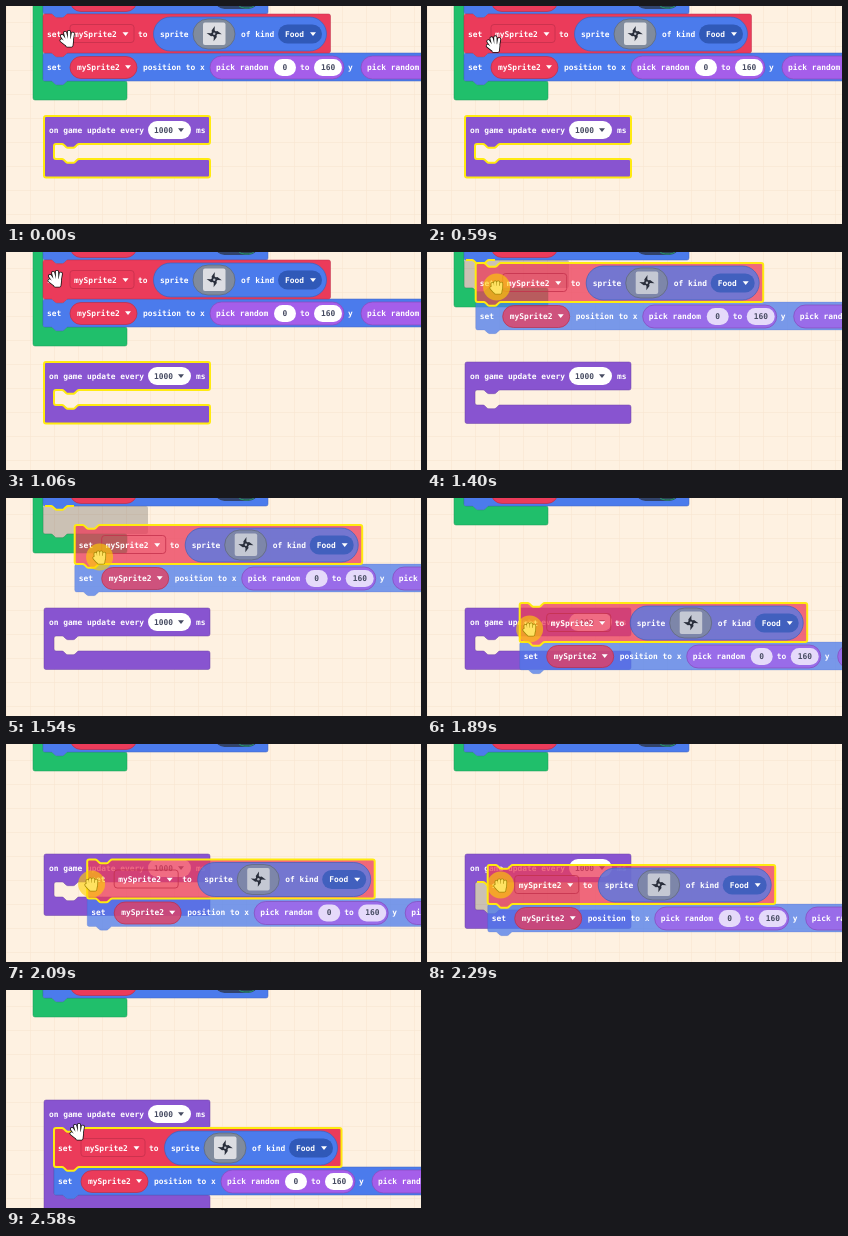
Animation, 415 px wide and 218 px high, one loop 4.56 s. Source, as an HTML page:

```html
<!DOCTYPE html>
<html lang="en">
<head>
<meta charset="utf-8">
<title>Moving code blocks</title>
<style>
html, body { margin: 0; width: 100%; height: 100%; overflow: hidden; background: #fef1e1; }
svg { display: block; }
text { font: 700 7.9px "DejaVu Sans Mono", "Noto Sans Mono", monospace; fill: #fff; }
text.dark { fill: #474c62; }
.drag .b { fill-opacity: .75; }
.drag .edge { stroke-opacity: .4; }
.sel { stroke: #ffea10; stroke-width: 2; stroke-opacity: 1 !important; }
</style>
</head>
<body>
<svg id="stage" width="415" height="218" viewBox="0 0 415 218"></svg>
<script>
const RED = '#eb3b5a', BLUE = '#4b7bec', PURPLE = '#8854d0', GREEN = '#20bf6b', MATH = '#a55eea';
const EDGE = { [RED]: '#bc2f48', [BLUE]: '#3c62bd', [PURPLE]: '#6d43a6', [GREEN]: '#1a9956', [MATH]: '#844bbb' };

// Connector outline, drawn to the right (s = 1) or to the left (s = -1)
const notch = s => `c${.9 * s},0 ${1.4 * s},.5 ${1.9 * s},.9l${1.9 * s},1.9` +
  `c${.5 * s},.5 ${.9 * s},.9 ${1.9 * s},.9h${5.6 * s}` +
  `c${.9 * s},0 ${1.4 * s},-.5 ${1.9 * s},-.9l${1.9 * s},-1.9c${.5 * s},-.5 ${.9 * s},-.9 ${1.9 * s},-.9`;

const rowPath = (w, h) => `M0,2q0,-2 2,-2h6${notch(1)}H${w - 2}q2,0 2,2V${h - 2}` +
  `q0,2 -2,2H25${notch(-1)}h-6q-2,0 -2,-2z`;

const loopPath = (w, gap, bar) => `M0,2q0,-2 2,-2H${w - 2}q2,0 2,2V26q0,2 -2,2H35${notch(-1)}H12` +
  `q-2,0 -2,2V${26 + gap}q0,2 2,2h6${notch(1)}H${w - 2}q2,0 2,2v${bar - 4}q0,2 -2,2H2q-2,0 -2,-2z`;

const path = (d, fill, id = '') =>
  `<path class="b edge" id="${id}" d="${d}" fill="${fill}" stroke="${EDGE[fill]}" stroke-width=".5"/>`;
const pill = (x, y, w, h, fill, edge = EDGE[fill] || 'none') =>
  `<rect class="b" x="${x}" y="${y}" width="${w}" height="${h}" rx="${h / 2}" fill="${fill}" stroke="${edge}" stroke-width=".7"/>`;
const text = (x, y, s, cls = '') => `<text class="${cls}" x="${x}" y="${y + 2.7}">${s}</text>`;
const arrow = (x, y, fill = '#fff') => `<path d="M${x - 3},${y - 1.7}h6l-3,3.6z" fill="${fill}"/>`;
const group = (id, x, y, body) => `<g id="${id}" transform="translate(${x} ${y})">${body}</g>`;

const random = x => pill(x, 42, 134, 23, MATH) + text(x + 6, 53, 'pick random') +
  pill(x + 64, 45, 22, 17, '#fff') + text(x + 72.6, 53, '0', 'dark') + text(x + 90, 53, 'to') +
  pill(x + 104, 45, 28, 17, '#fff') + text(x + 111, 53, '160', 'dark');

const blade = a => `<path transform="rotate(${a})" d="M-2.2,-1L-2.6,-3.2L.6,-7.6L.4,-3.4L2,-1.6L0,0z" fill="#2a2f3c"/>`;
const star = `<g transform="translate(171.2 19.7)">${[0, 90, 180, 270].map(blade).join('')}` +
  `<circle r="1.2" fill="#b9bcc6"/></g>`;

const setRow = path(rowPath(287.5, 39), RED, 'setBlock') + text(4, 20, 'set') +
  `<rect x="27" y="10.5" width="64" height="18" rx="3" fill="none" stroke="#c5304c" stroke-width=".8"/>` +
  text(31, 20, 'mySprite2') + arrow(82.5, 20) + text(95, 20, 'to') +
  pill(110.5, 3, 173, 34, BLUE) + text(117, 20, 'sprite') +
  pill(150, 5, 42, 30, '#808b9d', '#5d6675') +
  `<rect class="b" x="160" y="8.5" width="22.5" height="22.5" rx="2" fill="#dcdde2"/>` + star +
  text(198, 20, 'of kind') + pill(235, 10.5, 44, 19, '#3059b8') + text(242, 20, 'Food') + arrow(270, 20);

const placeRow = `<g transform="translate(0 39)">${path(rowPath(560, 28), BLUE)}</g>` + text(4, 53, 'set') +
  pill(27, 42.5, 67, 22, RED) + text(34, 53, 'mySprite2') + arrow(85, 53) +
  text(100, 53, 'position to x') + random(167) + text(305, 53, 'y') + random(318);

const openHand = 'M-6,-3L-2.5,2M-2.8,-6L-1,1M1,-7L1.2,1M4.8,-5.2L3.6,2M-6.5,1.5L-2,5M-2.5,1L4,1L3.4,6.5L-.8,6.5Z';
const fist = 'M-3.5,-3L-3,1M-.8,-4.5L-.6,1M2.2,-4.5L2,1M5.2,-3.2L5,2M-4.6,1L-1.5,4.5M-3,0L5,0L4.2,5.5L-.5,5.5Z';

let grid = '';
for (let x = 0; x < 415; x += 24) grid += `M${x + .5},0V218`;
for (let y = 16; y < 218; y += 24) grid += `M0,${y + .5}H415`;

const $ = id => document.getElementById(id);
$('stage').innerHTML = `<path d="${grid}" stroke="#f8e6d0" stroke-opacity=".6"/>` +
  group('loop', 27, -60, path('', GREEN, 'loopBlock')) +
  group('top', 37, -20, path(rowPath(225, 28), BLUE) + pill(27, 3.5, 67, 22, RED) +
    pill(172, 4, 43, 19, '#31436b') + pill(193, 5, 21, 17, '#2c4257', GREEN)) +
  group('update', 38, 110, path('', PURPLE, 'updateBlock') + text(5, 14, 'on game update every') +
    pill(104, 5, 43, 18, '#fff') + text(110, 14, '1000', 'dark') + arrow(137, 14, '#474c62') + text(152, 14, 'ms')) +
  group('marker', 0, 0, `<path d="${rowPath(105, 28)}" fill="#000" fill-opacity=".2"/>` +
    `<path d="M2,0h6${notch(1)}h6" fill="none" stroke="#ffea10" stroke-width="2"/>`) +
  group('stack', 37, 8, placeRow + setRow) +
  group('hand', 0, 0, '<g stroke-linecap="round" stroke-linejoin="round">' +
    '<path id="handEdge" fill="#111" stroke="#111" stroke-width="4"/>' +
    '<path id="handFill" fill="#fff" stroke="#fff" stroke-width="2.4"/></g>' +
    '<circle id="ring" cx=".6" r="13.5" fill="#ffd000" fill-opacity=".62"/>');

// Screen refresh times and pointer path [ms, x, y]
const ticks = [0, 590, 680, 780, 870, 970, 1060, 1130, 1200, 1330, 1400, 1470, 1540, 1610, 1680, 1750,
  1820, 1890, 1970, 2030, 2100, 2160, 2240, 2290, 2370, 2440, 2510, 2580];
const trail = [[0, 62, 33], [520, 62, 33], [690, 75, 46], [820, 76, 57], [960, 58, 38], [1060, 50, 27],
  [1260, 50, 27], [1330, 61, 31], [1400, 69, 35], [1610, 105, 71], [1680, 108, 87], [1750, 109, 105],
  [1820, 105, 125], [1890, 102, 131], [2030, 85, 140], [2160, 73, 142], [2220, 73, 141], [2290, 73, 141],
  [2440, 72, 142], [4560, 72, 142]];

function pointer(t) {
  const i = trail.findIndex(k => k[0] > t), [t0, x0, y0] = trail[i - 1], [t1, x1, y1] = trail[i];
  const f = (t - t0) / (t1 - t0);
  return [x0 + (x1 - x0) * f, y0 + (y1 - y0) * f];
}

const move = (id, x, y) => $(id).setAttribute('transform', `translate(${x} ${y})`);
const LAG = 70, GRIP = [12.3, 20], PRESS = 1130, SELECT = 1200, LIFT = 1330, LEAVE = 1680, ENTER = 2240, DROP = 2440;

function draw(now) {
  const ms = now % 4560, t = ticks.findLast(k => k <= ms);
  const dragging = t >= LIFT && t < DROP, pressed = t >= PRESS && t < DROP;

  // The dragged stack trails the pointer by one refresh
  const [px, py] = pointer(Math.max(0, t - LAG));
  const at = t < LIFT ? [37, 8] : dragging ? [px - GRIP[0], py - GRIP[1]] : [48, 138];
  move('stack', ...at);
  $('stack').setAttribute('class', dragging ? 'drag' : '');

  const loopGap = t < LIFT ? 67 : t < LEAVE ? 28 : 0;
  const updateGap = t < ENTER ? 15 : t < DROP ? 28 : 67;
  $('loopBlock').setAttribute('d', loopPath(94, 40 + loopGap, 19));
  $('updateBlock').setAttribute('d', loopPath(166, updateGap, 18.5));
  $('updateBlock').setAttribute('class', t < SELECT ? 'b edge sel' : 'b edge');
  $('setBlock').setAttribute('class', t < SELECT ? 'b edge' : 'b edge sel');

  move('marker', ...(t < LEAVE ? [37, 8] : [48, 138]));
  $('marker').style.display = dragging && (t < LEAVE || t >= ENTER) ? '' : 'none';

  move('hand', ...pointer(t));
  $('ring').style.display = pressed ? '' : 'none';
  for (const id of ['handEdge', 'handFill']) $(id).setAttribute('d', pressed ? fist : openHand);
}

let start;
function frame(now) {
  start ??= now;
  draw(Math.max(0, now - start));
  requestAnimationFrame(frame);
}
draw(0);
requestAnimationFrame(frame);
</script>
</body>
</html>
```
